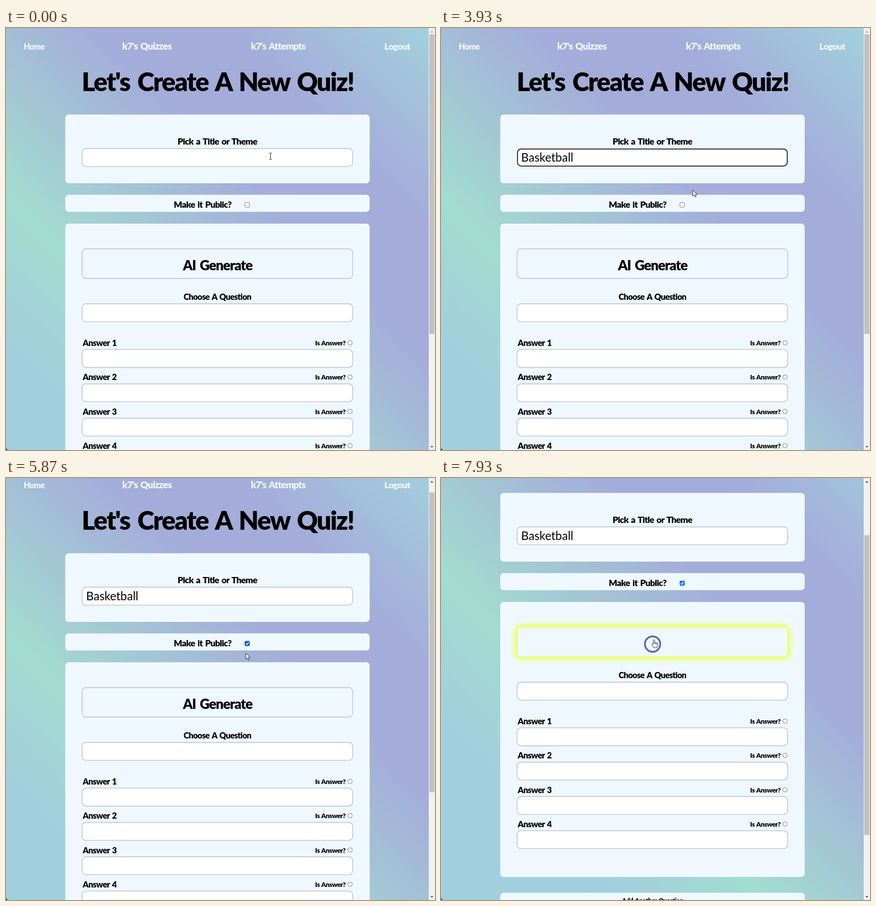
An HTML page that plays this animation: 755 by 742 pixels, repeating every 8000 ms.

```html
<!DOCTYPE html>
<html lang="en">
<head>
<meta charset="utf-8">
<title>Create a quiz</title>
<style>
  html, body { margin: 0; width: 100%; height: 100%; overflow: hidden; }
  svg { display: block; }
  text { font-family: Lato, "Open Sans", sans-serif; font-weight: 900; letter-spacing: -.04em; word-spacing: .1em; white-space: pre; }
  #typed { font-weight: 400; letter-spacing: 0; }
</style>
</head>
<body>
<svg id="stage" width="755" height="742" viewBox="0 0 755 742">
  <defs>
    <!-- 45 degree page gradient -->
    <linearGradient id="bg" gradientUnits="userSpaceOnUse" x1="-67.25" y1="945.75" x2="811.25" y2="67.25">
      <stop offset=".27" stop-color="#a2cfdd"/>
      <stop offset=".41" stop-color="#a2dccf"/>
      <stop offset=".67" stop-color="#a4acda"/>
      <stop offset=".8" stop-color="#a4acda"/>
      <stop offset="1" stop-color="#a2d0dc"/>
    </linearGradient>
    <filter id="soft" x="-10%" y="-60%" width="120%" height="220%"><feGaussianBlur stdDeviation="4.5"/></filter>
  </defs>
  <g id="page">
    <rect width="744" height="1013" fill="url(#bg)"/>
  </g>
  <g id="bar">
    <rect x="744" width="11" height="742" fill="#f1f1f1"/>
    <rect id="thumb" x="745" y="11" width="9" height="527" fill="#c1c1c1"/>
    <path id="up" d="M747 8h5l-2.500-3z"/>
    <path d="M747 735h5l-2.500 3z" fill="#505050"/>
  </g>
  <path d="M0 738v4h4q-3 -1 -4 -4z" fill="#2b3440"/>
  <g id="mouse">
    <path id="beam" d="M-2.500 -5.500h2l.5 .5l.5 -.5h2M0 -5v10M-2.500 5.500h2l.5 -.5l.5 .5h2" fill="none" stroke="#333" stroke-width="1"/>
    <path id="arrow" d="M0 0v10.500l2.500 -2.200l1.700 3.900l1.900 -.8l-1.700 -3.800h3.300z" fill="#fff" stroke="#222a3c" stroke-width=".9"/>
    <path id="hand" d="M-.5 8V1.200q1.200 -1.800 2.300 0V5.500q1.200 -.8 2 .3q1.200 -.7 1.900 .4q1.500 -.4 1.700 1.100v3.400l-1.400 3.500h-5.500l-3.600 -5.500q.4 -1.700 2.600 -.7zM1.800 5.500v2.500M3.800 5.800v2.300M5.700 6.200v2" fill="#fff" stroke="#222a3c" stroke-width=".9"/>
  </g>
</svg>
<script>
const LOOP = 8000, WORD = "Basketball";
const KEYS = [1130, 1270, 1400, 1470, 1600, 1800, 2000, 2070, 2270, 2330];
const $ = id => document.getElementById(id);
const page = $("page");

function add(tag, attrs, content) {
  const el = document.createElementNS("http://www.w3.org/2000/svg", tag);
  for (const k in attrs) el.setAttribute(k, attrs[k]);
  if (content) el.textContent = content;
  return page.appendChild(el);
}
const set = (el, attrs) => { for (const k in attrs) el.setAttribute(k, attrs[k]); };
const show = (el, on) => el.setAttribute("visibility", on ? "visible" : "hidden");
const box = (x, y, w, h, rx, more) => add("rect", { x, y, width: w, height: h, rx, ...more });
const label = (s, x, y, size, anchor = "middle", fill = "#000") =>
  add("text", { x, y, "font-size": size, "text-anchor": anchor, fill }, s);
const card = (y, h) => box(104.3, y, 535.7, h, 6, { fill: "#f0f8ff" });
const field = (y, h = 31.600, fill = "#fff") =>
  box(133.8, y, 476.4, h, 7, { fill, stroke: "#c5ccd5", "stroke-width": 1.6 });

// navigation and heading
[["Home", 49.5, 14.2], ["k7's Quizzes", 248, 16.8], ["k7's Attempts", 479, 16.6], ["Logout", 688.5, 15.6]]
  .forEach(([s, x, size]) => label(s, x, 38, size, "middle", "#f0f8ff"));
label("Let's Create A New Quiz!", 372.5, 111, 45.3);

// title card
card(152.2, 120.8);
label("Pick a Title or Theme", 372, 205, 15.6);
const title = field(211.9);
const outline = box(134.6, 212.7, 474.8, 30, 6.5, { fill: "none", stroke: "#101010", "stroke-width": 1.5 });
const typed = label("", 141, 235, 20.6, "start");
typed.id = "typed";
const caret = box(233, 217, 1, 22, 0, { fill: "#000" });

// public card
card(293.2, 30);
label("Make it Public?", 346, 316, 15.6);
const check = box(420.5, 307, 8, 8, 1.3, {});
const tick = add("path", { d: "M422 311.200l1.800 1.800l3.400 -4", fill: "none", stroke: "#fff", "stroke-width": 1.4 });

// question card
card(344, 483.4);
const glow = add("g", {});
glow.append(
  box(132, 387, 480, 55, 9, { fill: "#eaff62", stroke: "#eaff62", "stroke-width": 7, filter: "url(#soft)" }),
  box(134, 388.700, 476, 51.500, 6, { fill: "#f0f8ff", stroke: "#eefa95", "stroke-width": 2 }));
const button = field(388.4, 52, "none");
const halo = label("AI Generate", 372.5, 426, 24, "middle", "#f0f890");
halo.setAttribute("filter", "url(#soft)");
const action = label("AI Generate", 372.5, 426, 24);
const ring = add("circle", { cx: 372.4, cy: 418, fill: "none", stroke: "#5268b2" });
label("Choose A Question", 372, 478, 14.6);
field(484.9);
for (let i = 0; i < 4; i++) {
  const y = 559 + i * 60.3;
  label("Answer " + (i + 1), 135, y, 14.8, "start");
  label("Is Answer?", 597.5, y - 1, 11.7, "end");
  add("circle", { cx: 605.5, cy: y - 5.500, r: 3.9, fill: "#fff", stroke: "#767676", "stroke-width": .9 });
  field(y + 6.300);
}
card(855.3, 60);
label("Add Another Question", 372.5, 873, 11.3);

const clamp = v => Math.max(0, Math.min(1, v));
const ramp = (t, a, b) => clamp((t - a) / (b - a));
const ease = p => p * p * (3 - 2 * p);
const mix = (a, b, p) => a + (b - a) * p;

const PATH = [[3000, 465.5, 225.5], [3130, 452.5, 225.5], [3620, 452.5, 225.5], [3930, 443, 285],
  [4400, 429, 316], [4800, 430, 378], [5330, 422, 308], [6080, 422, 308], [6400, 374, 284]];
function mouseAt(t) {
  let i = 0;
  while (i < PATH.length - 2 && t > PATH[i + 1][0]) i++;
  const [a, b] = [PATH[i], PATH[i + 1]], p = ease(ramp(t, a[0], b[0]));
  return [mix(a[1], b[1], p), mix(a[2], b[2], p)];
}

function caretOn(t) {
  if (t < 200 || t >= 5400) return false;
  if (t < 1130) return t < 800;
  if (t < 2930) return true;
  return (t >= 3400 && t < 3930) || (t >= 4470 && t < 5000);
}

function draw(t) {
  const scroll = Math.round(126 * ease(ramp(t, 5810, 6055)));
  page.setAttribute("transform", `translate(0 ${-scroll})`);
  $("thumb").setAttribute("y", 11 + scroll * .711);
  $("up").setAttribute("fill", scroll ? "#505050" : "#a3a3a3");

  // typing and focus
  const word = WORD.slice(0, KEYS.filter(k => t >= k).length);
  if (typed.textContent !== word) typed.textContent = word;
  caret.setAttribute("x", 141 + (word ? Math.round(typed.getComputedTextLength()) : 0));
  show(caret, caretOn(t));
  const focus = t >= 200 && t < 5400;
  title.setAttribute("stroke", focus ? "#f0f8ff" : "#c5ccd5");
  show(outline, focus);

  // checkbox
  const checked = t >= 5470, over = t >= 5100 && t < 6130;
  const blue = over ? "#005cc8" : "#0075ff";
  set(check, { fill: checked ? blue : "#fff", stroke: checked ? blue : "#767676", "stroke-width": .9 });
  show(tick, checked);

  // button hover, then loading ring
  const hover = ramp(t, 6100, 6440), loading = t >= 6870;
  glow.setAttribute("opacity", hover);
  button.setAttribute("opacity", 1 - hover);
  halo.setAttribute("opacity", loading ? 0 : hover);
  show(action, !loading);
  show(ring, loading);
  const turn = ((t - 6850) / 750 % 1 + 1) % 1;
  const scale = .8 + .4 * Math.abs(turn - .5);
  set(ring, { r: 16.4 * scale, "stroke-width": 3.7 * scale });

  // pointer
  const [x, y] = mouseAt(t);
  $("mouse").setAttribute("transform", `translate(${x} ${y})`);
  const inField = t < 5000 && y < 244, onButton = t >= 6100;
  show($("beam"), inField);
  show($("arrow"), !inField && !onButton);
  show($("hand"), onButton);
}

const start = performance.now();
function frame() {
  draw((performance.now() - start) % LOOP);
  requestAnimationFrame(frame);
}
draw(0);
requestAnimationFrame(frame);
</script>
</body>
</html>
```
